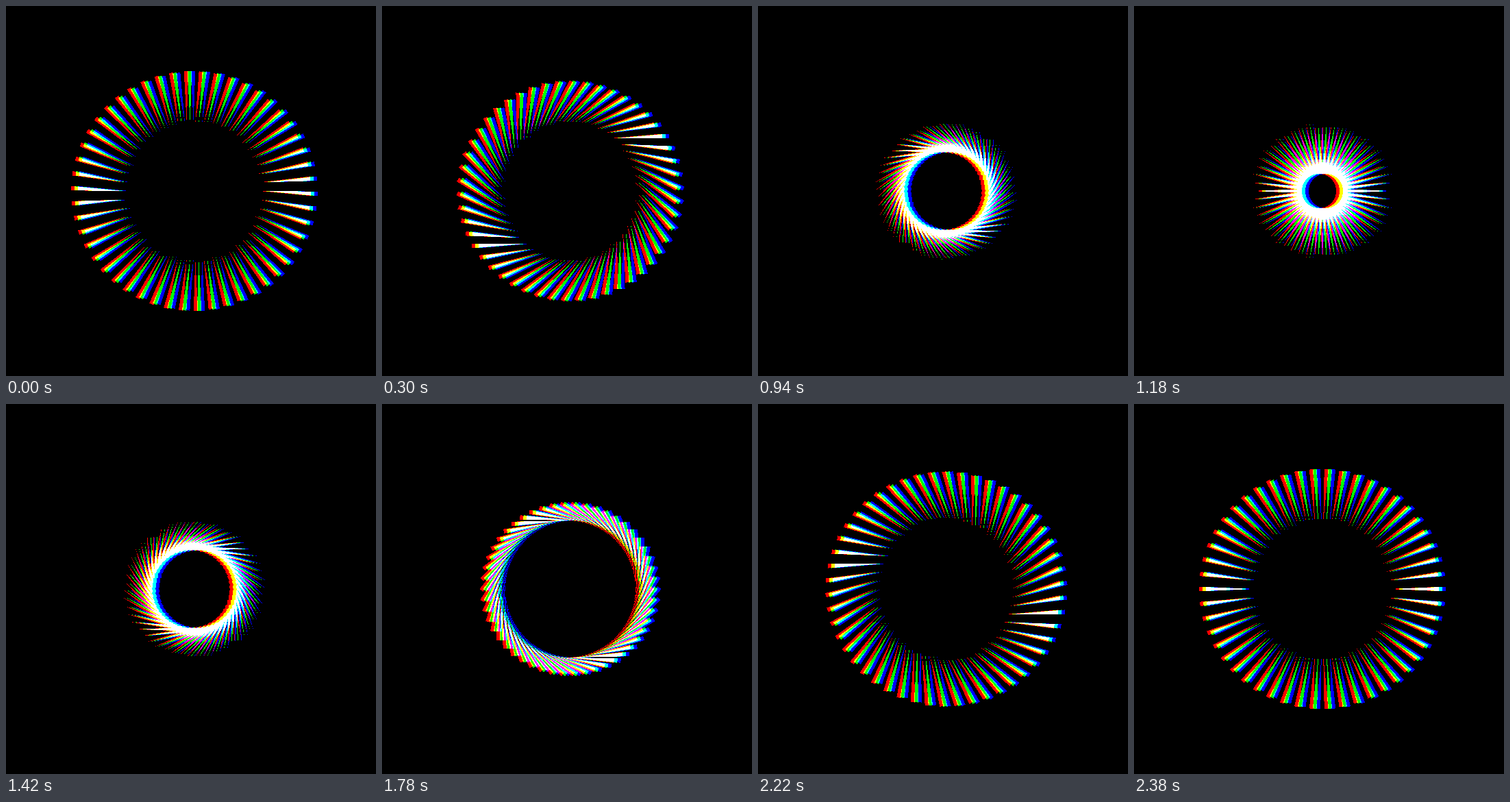
Write an HTML page that moves like this. It is 540x540 px and loops after 2.4 s.

```html
<!DOCTYPE html>
<html lang="en">
<head>
<meta charset="utf-8">
<title>Turning spokes</title>
<style>
  html, body { margin: 0; width: 100%; height: 100%; overflow: hidden; background: #000; }
  svg { display: block; width: 100%; height: 100%; isolation: isolate; background: #000; }
  path { mix-blend-mode: screen; shape-rendering: crispEdges; }
</style>
</head>
<body>
<svg viewBox="0 0 540 540">
  <path fill="#f00" transform="translate(270 270)"/>
  <path fill="#0f0" transform="translate(275 270)"/>
  <path fill="#00f" transform="translate(280 270)"/>
</svg>
<script>
  const SPOKES = 50;
  const RING = 100;
  const LENGTH = 75;
  const HALF_WIDTH = 3.25;
  const STEP_MS = 20;
  const STEPS = 120;
  const TAU = Math.PI * 2;
  const layers = document.querySelectorAll('path');

  const point = (x, y) => x.toFixed(3) + ' ' + y.toFixed(3);

  // A thin triangle whose tip stays on the ring while its base swings around it.
  function spoke(angle, turn) {
    const tipX = RING * Math.cos(angle);
    const tipY = RING * Math.sin(angle);
    const dx = Math.cos(angle + turn);
    const dy = Math.sin(angle + turn);
    const baseX = tipX + LENGTH * dx;
    const baseY = tipY + LENGTH * dy;
    return 'M' + point(tipX, tipY) +
      'L' + point(baseX + HALF_WIDTH * dy, baseY - HALF_WIDTH * dx) +
      'L' + point(baseX - HALF_WIDTH * dy, baseY + HALF_WIDTH * dx) + 'Z';
  }

  function draw(ms) {
    const step = (Math.floor(ms / STEP_MS) + 1) % STEPS;
    const turn = step / STEPS * TAU;
    let shape = '';
    for (let i = 0; i < SPOKES; i++) shape += spoke(i / SPOKES * TAU, turn);
    layers.forEach(layer => layer.setAttribute('d', shape));
  }

  let start;
  function tick(now) {
    start ??= now;
    draw(now - start);
    requestAnimationFrame(tick);
  }
  draw(0);
  requestAnimationFrame(tick);
</script>
</body>
</html>
```
